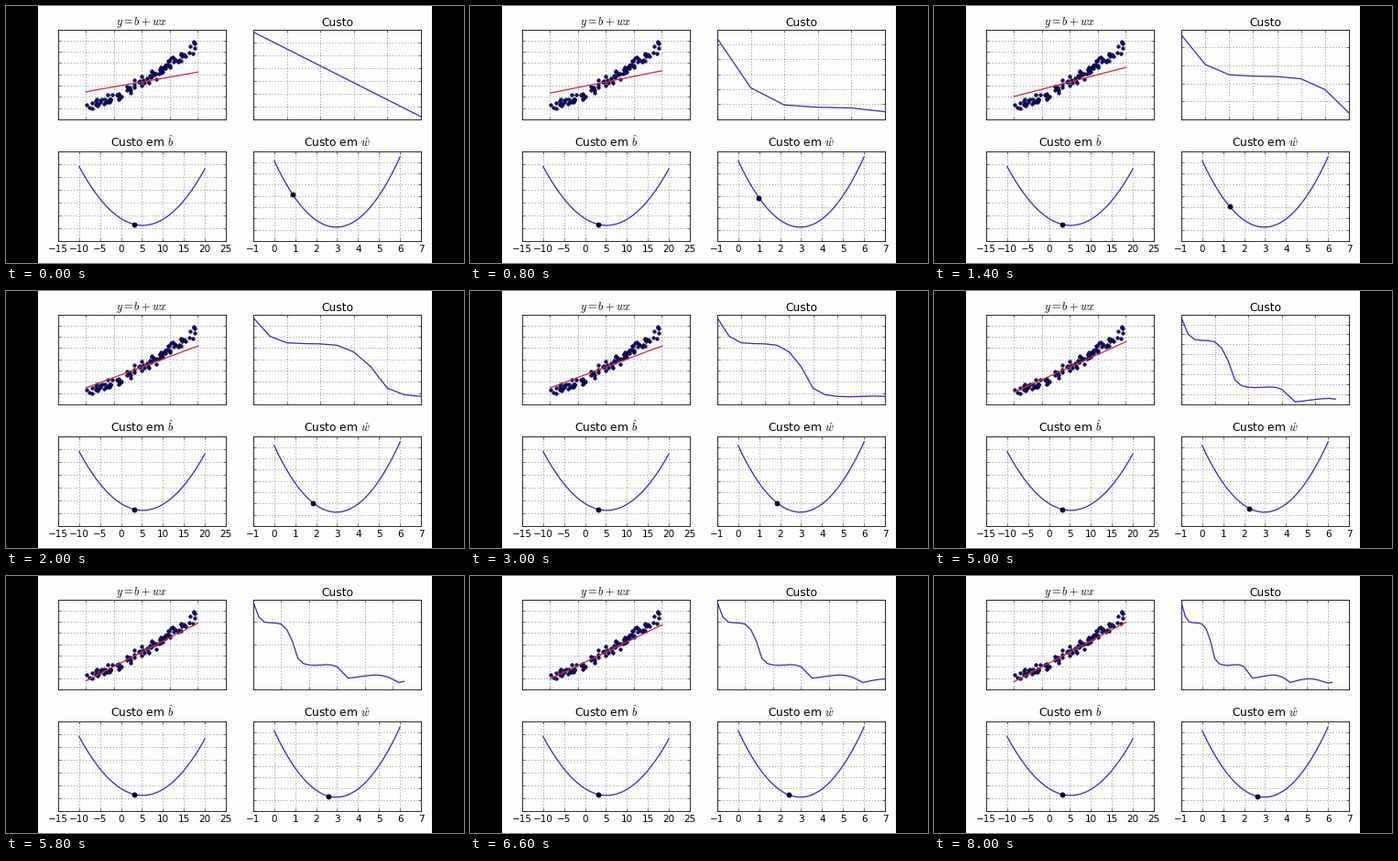
Write a matplotlib script that moves like this. It is 500 by 281 pixels and loops after 8200 ms.

```python
import numpy as np
import matplotlib.pyplot as plt
from matplotlib.animation import FuncAnimation
from matplotlib.patches import Rectangle

W, H, DPI = 500, 281, 100
FRAMES, STEP_MS = 41, 200
PX = 72 / DPI                      # points per pixel
BLUE, RED, NAVY = "#3a2cc8", "#d22a38", "#06063c"

plt.rcParams.update({"font.family": "DejaVu Sans", "mathtext.fontset": "cm",
                     "axes.unicode_minus": True})

# Cost after each gradient step
COST = np.array([
    194, 161, 149.5, 148, 147.5, 145, 133, 107, 68.5, 57, 54, 53.3, 53.8,
    54.6, 54, 50, 37, 24.8, 26, 28, 29.5, 31, 31.7, 30.3, 27.4, 22, 15.2,
    17.5, 20, 22, 23, 23.2, 22, 19.5, 16.5, 13.8, 15.6])


def cost_b(b):
    return (b - 5.15) ** 2 + 10.5


def cost_w(w):
    return 33.8 * (w - 2.96) ** 2 + 11


def weight(cost):
    return 3 - np.sqrt((cost - 11.5) / 33)


def nice_ticks(lo, hi, bins=9):
    """Round limits outwards to at most `bins` even intervals."""
    raw = (hi - lo) / bins
    scale = 10 ** np.floor(np.log10(raw))
    for step in scale * np.array([1, 2, 5, 10, 20]):
        start = step * np.floor(lo / step + 1e-9)
        if step >= raw and start + step * bins >= hi - 1e-9:
            break
    count = int(np.ceil((hi - start) / step - 1e-9))
    return start + step * np.arange(count + 1)


def set_ticks(ax, xt, yt):
    ax.set_xticks(xt)
    ax.set_yticks(yt)
    ax.set_xlim(xt[0], xt[-1])
    ax.set_ylim(yt[0], yt[-1])


def panel(left, top, title, baseline, labels=False):
    w, h = 183.1, 98.2
    ax = fig.add_axes([left / W, 1 - (top + h) / H, w / W, h / H])
    ax.tick_params(direction="in", top=True, right=True, length=3.4 * PX,
                   width=0.5 * PX, pad=4.2 * PX, labelsize=10.4 * PX,
                   labelleft=False, labelbottom=labels)
    ax.grid(True, color="black", lw=0.6 * PX, alpha=0.75,
            linestyle=(0, (1.5, 4)))
    for spine in ax.spines.values():
        spine.set_linewidth(0.9 * PX)
        spine.set_color("#1c1c1c")
    fig.text((left + w / 2) / W, 1 - baseline / H, title, ha="center",
             va="baseline", fontsize=12.3 * PX)
    return ax


def curve(ax, x, y, color=BLUE):
    return ax.plot(x, y, color=color, lw=1.3 * PX)[0]


def dot(ax):
    return ax.plot([], [], "o", ms=5.2 * PX, mfc=NAVY, mec="black",
                   mew=0.6 * PX, zorder=4)[0]


fig = plt.figure(figsize=(W / DPI, H / DPI), dpi=DPI, facecolor="black")
fig.add_artist(Rectangle((35 / W, 0), 430 / W, 1, color="#fefdfe", lw=0,
                         transform=fig.transFigure, zorder=-5))

ax_fit = panel(56.9, 25.6, "$y = b + wx$", 21)
ax_cost = panel(269.9, 25.6, "Custo", 21.7)
ax_b = panel(56.9, 158.6, r"Custo em $\hat{b}$", 154, labels=True)
ax_w = panel(269.9, 158.6, r"Custo em $\hat{w}$", 154, labels=True)
for ax in fig.axes:
    ax.set_facecolor("#fefdfe")

rng = np.random.default_rng(3)
x = rng.uniform(-10, 10, 100)
noise = rng.normal(0, 2.7, 100)
y = 3.5 + 2.85 * x + 0.05 * x ** 2 + np.clip(noise - noise.mean(), -5, 5)
ax_fit.plot(x, y, "o", ms=3.5 * PX, mfc="#10107c", mec="#040430",
            mew=0.7 * PX, zorder=1.5)
set_ticks(ax_fit, np.arange(-15, 16, 5), np.arange(-30, 51, 10))
fit = curve(ax_fit, [], [], RED)

cost_line = curve(ax_cost, [], [])

bs = np.linspace(-10, 20, 100)
curve(ax_b, bs, cost_b(bs))
set_ticks(ax_b, np.arange(-15, 26, 5), np.arange(-50, 301, 50))
b_dot = dot(ax_b)

ws = np.linspace(0, 6, 100)
curve(ax_w, ws, cost_w(ws))
set_ticks(ax_w, np.arange(-1, 8), np.arange(-50, 351, 50))
w_dot = dot(ax_w)


def update(i):
    n = 1 + int(0.875 * i + 0.625)
    seen = COST[:n + 1]
    w, b = weight(COST[n]), 3.25 - 0.1 * n / 36
    ends = np.array([-10, 10])
    fit.set_data(ends, b + w * ends)
    cost_line.set_data(np.arange(n + 1), seen)
    set_ticks(ax_cost, nice_ticks(0, n), nice_ticks(seen.min(), seen.max()))
    b_dot.set_data([b], [cost_b(b)])
    w_dot.set_data([w], [cost_w(w)])
    return fit, cost_line, b_dot, w_dot


anim = FuncAnimation(fig, update, frames=FRAMES, interval=STEP_MS,
                     repeat=True, repeat_delay=0, blit=False)
plt.show()
```
